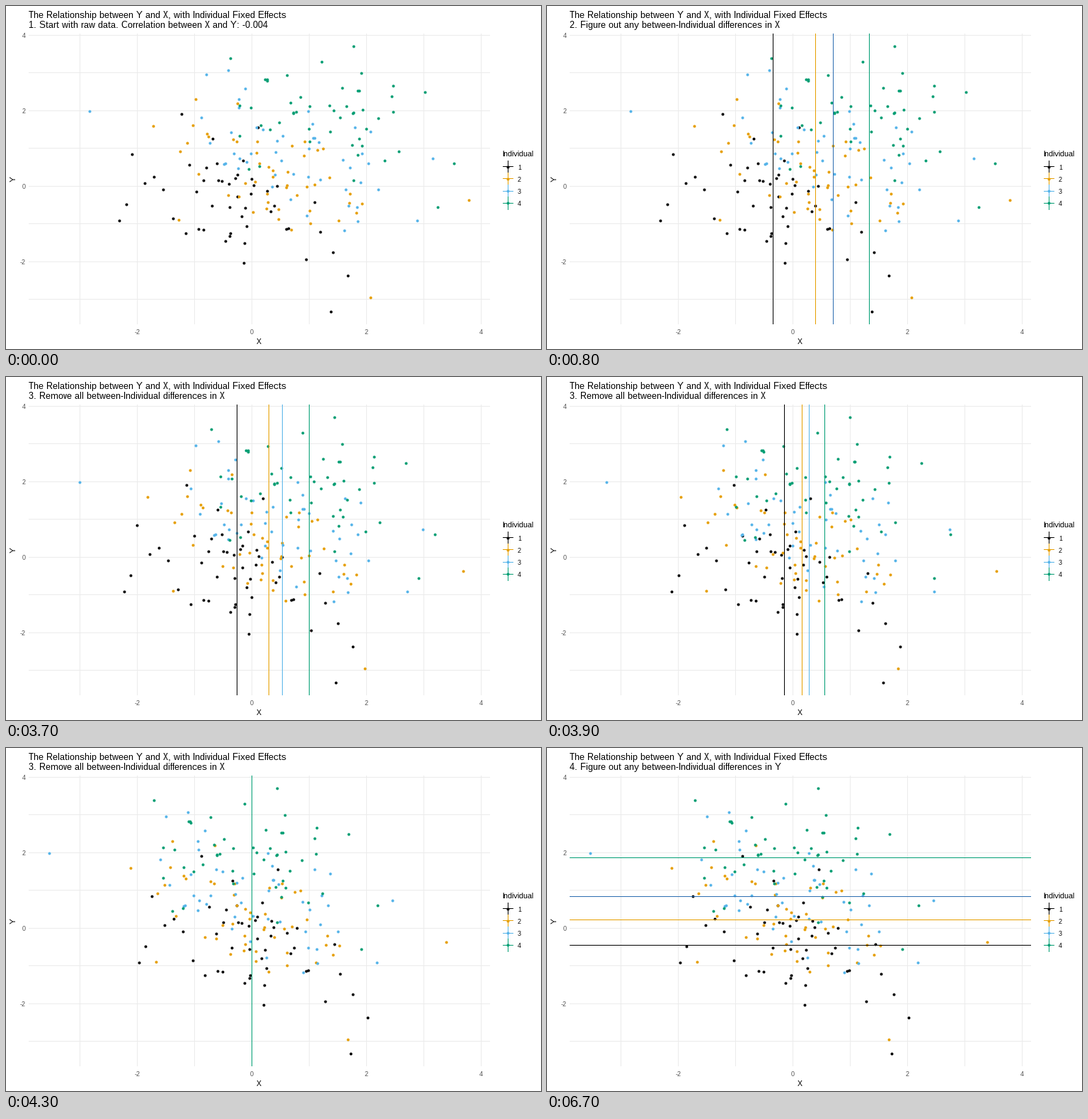
Recreate the animation shown at these times as a matplotlib script. Size 756x486 px, loop 8 s.

```python
import numpy as np
import matplotlib.pyplot as plt
from matplotlib.animation import FuncAnimation

W, H, DPI = 756, 486, 72
STEP, FRAMES = 100, 80
LEFT, RIGHT, TOP, BOTTOM = 32, 684, 39, 451
X0, Y0 = 347.4, 255.2          # data origin on the stage
X_UNIT, Y_UNIT = 80.9, 53.45   # pixels per data unit
GROUP_SIZE = 50

TITLE = "The Relationship between Y and X, with Individual Fixed Effects"
STAGES = [
    (0, "1. Start with raw data. Correlation between X and Y: -0.004"),
    (500, "2. Figure out any between-Individual differences in X"),
    (3500, "3. Remove all between-Individual differences in X"),
    (6400, "4. Figure out any between-Individual differences in Y"),
]
SHOW_X_MEANS, SLIDE_START, SLIDE_END = 800, 3500, 4300
HIDE_X_MEANS, SHOW_Y_MEANS = 6400, 6700

# Each group is a random cloud around its mean with a few outliers.
GROUPS = [
    dict(color="#000000", mean=(319.5, 279.5), spread=(66, 38), slope=0.25,
         outliers=[(160, 304), (248, 153), (356, 172), (483, 382), (459, 433)]),
    dict(color="#E69F00", mean=(379.5, 243.5), spread=(66, 38), slope=0.4,
         outliers=[(208, 170), (244, 303), (515, 413), (654, 275)]),
    dict(color="#56B4E9", still="#2B6CB0", mean=(404.5, 210.5),
         spread=(72, 42), slope=0.3,
         outliers=[(118, 149), (314, 91), (603, 216), (581, 304)]),
    dict(color="#009E73", mean=(455.5, 155.5), spread=(68, 39), slope=0.1,
         outliers=[(317, 74), (491, 57), (633, 223), (610, 285)]),
]


def make_points(group, rng):
    outliers = np.array(group["outliers"], float)
    count = GROUP_SIZE - len(outliers)
    cloud = rng.triangular(-2.4, 0, 2.4, (count, 2))
    cloud = (cloud - cloud.mean(axis=0)) / cloud.std(axis=0) * group["spread"]
    cloud[:, 1] += group["slope"] * cloud[:, 0]
    center = (GROUP_SIZE * np.array(group["mean"]) - outliers.sum(axis=0)) / count
    return np.vstack([outliers, cloud + center])


plt.rcParams.update({
    "font.family": "Liberation Sans",
    "text.hinting": "native",
    "text.hinting_factor": 1,
    "text.kerning_factor": 6,
})
fig = plt.figure(figsize=(W / DPI, H / DPI), dpi=DPI, facecolor="white")
ax = fig.add_axes([0, 0, 1, 1])
ax.set(xlim=(0, W), ylim=(H, 0))
ax.axis("off")


def pixel(v):
    return np.floor(v) + 0.5


def line(xs, ys, color, z):
    return ax.plot(xs, ys, color=color, lw=1, antialiased=False, snap=False,
                   solid_capstyle="butt", zorder=z)[0]


def vline(x, color, z, top=TOP, bottom=BOTTOM):
    return line([pixel(x)] * 2, [top, bottom], color, z)


def hline(y, color, z, left=LEFT, right=RIGHT):
    return line([left, right], [pixel(y)] * 2, color, z)


def label(x, y, text, size, color="black", **kw):
    return ax.text(x, y, text, fontsize=size, color=color, **kw)


def dots(xy, color, z):
    return ax.scatter(*np.transpose(xy), s=4 ** 2, color=color, linewidths=0,
                      antialiased=False, snap=False, zorder=z)


def draw_axes():
    for k in range(-3, 5):
        x, y = X0 + k * X_UNIT, Y0 - k * Y_UNIT
        vline(x, "#EBEBEB", 1)
        hline(y, "#EBEBEB", 1)
        if k % 2 == 0:
            label(x, 465, str(k), 9, "#4D4D4D", ha="center")
            label(27.5, round(y) + 4, str(k), 9, "#4D4D4D", ha="right")
    label(357.5, 479, "X", 11, ha="center")
    label(11, 245, "Y", 11, ha="center", va="center", rotation=90)


def draw_legend():
    label(701, 213, "Individual", 11)
    for k, group in enumerate(GROUPS):
        top = 219 + 17.28 * k
        mid = top + 8.64
        vline(709, group["color"], 3, top, top + 17.28)
        hline(mid, group["color"], 3, 702, 717)
        dots([(709, round(mid))], group["color"], 3)
        label(723, round(mid) + 4, str(k + 1), 9)


draw_axes()
draw_legend()
label(32, 17, TITLE, 13)
subtitle = label(32, 31, "", 13)

rng = np.random.default_rng(7)
for group in GROUPS:
    mean_x, mean_y = group["mean"]
    group["points"] = make_points(group, rng)
    group["dots"] = dots(group["points"], group["color"], 4)
    group["vline"] = vline(mean_x, group["color"], 5)
    group["hline"] = hline(mean_y, group.get("still", group["color"]), 5)


def slide_progress(t):
    part = (t - SLIDE_START + STEP) / (SLIDE_END - SLIDE_START + STEP)
    return (1 - np.cos(np.pi * np.clip(part, 0, 1))) / 2


def update(frame):
    t = frame * STEP
    subtitle.set_text([text for start, text in STAGES if t >= start][-1])
    sliding = SLIDE_START <= t < SLIDE_END
    for group in GROUPS:
        mean_x = group["mean"][0]
        shift = slide_progress(t) * (X0 - mean_x)
        color = group["color"]
        group["dots"].set_offsets(np.round(group["points"] + [shift, 0]))
        group["vline"].set_xdata([pixel(mean_x + shift)] * 2)
        group["vline"].set_color(color if sliding else group.get("still", color))
        group["vline"].set_visible(SHOW_X_MEANS <= t < HIDE_X_MEANS)
        group["hline"].set_visible(t >= SHOW_Y_MEANS)
    return []


anim = FuncAnimation(fig, update, frames=FRAMES, interval=STEP,
                     init_func=lambda: update(0), repeat=True, repeat_delay=0)
plt.show()
```
